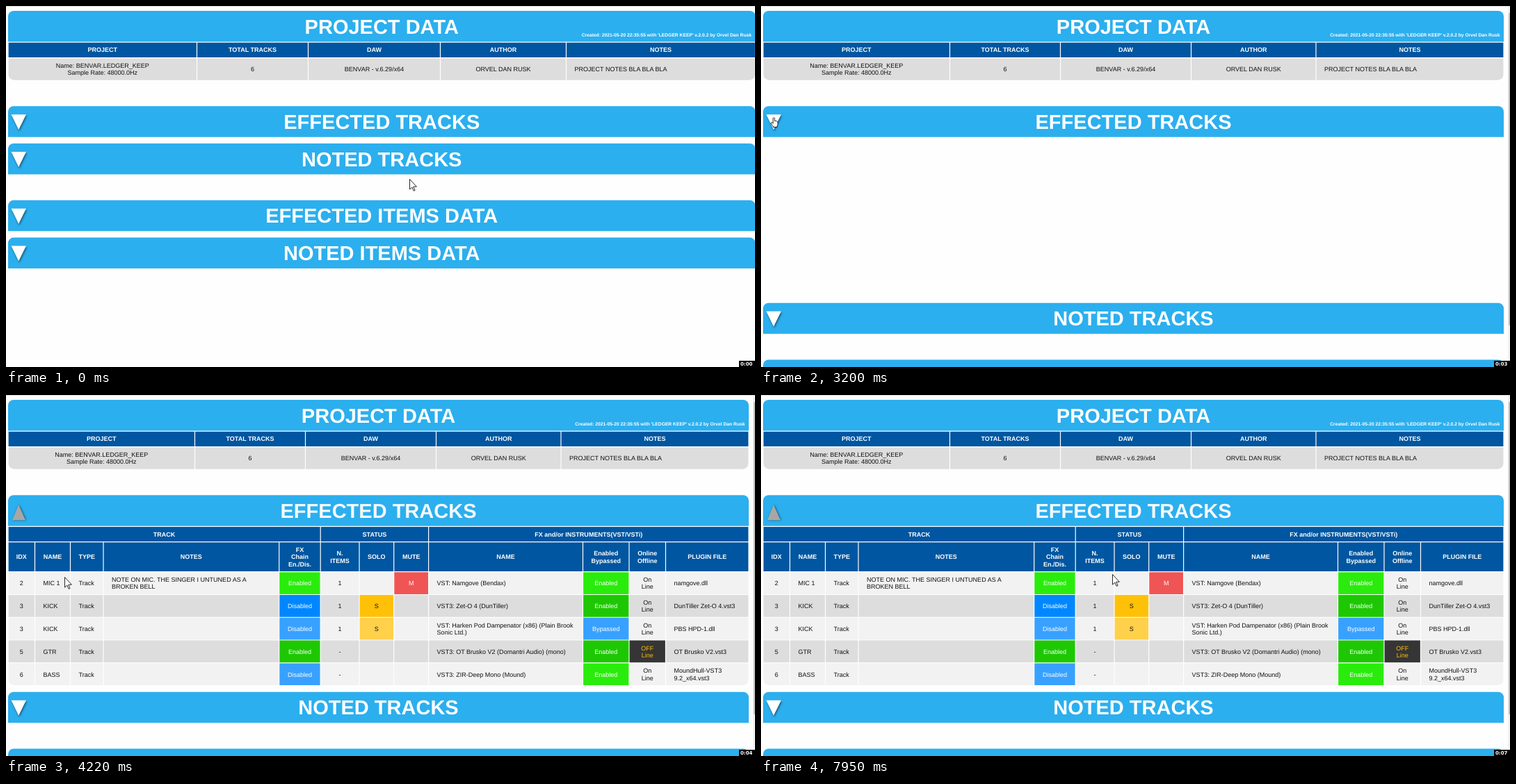
Animation, 1077 px wide and 520 px high, one loop 8000 ms. Source, as an HTML page with a canvas:

```html
<!DOCTYPE html>
<html lang="en">
<head>
<meta charset="utf-8">
<title>Project data</title>
<style>
  html, body { margin: 0; width: 100%; height: 100%; overflow: hidden; background: #fefefe; }
  canvas { display: block; }
</style>
</head>
<body>
<canvas id="stage" width="1077" height="520"></canvas>
<script>
const ctx = document.getElementById('stage').getContext('2d');
const LOOP = 8000;
const OPEN_AT = 3200, SHOW_AT = 3430;
const BAR = '#2cafee', NAVY = '#0056a0', INK = '#111';
const SANS = '"Liberation Sans", Arial, sans-serif';
const CELL = 9.03, HEAD = 29, LINE = 10.2, GAP = 1.2;

const PROJECT_HEAD = ['PROJECT', 'TOTAL TRACKS', 'DAW', 'AUTHOR', 'NOTES'];
const PROJECT_ROW = ['Name: BENVAR.LEDGER_KEEP\nSample Rate: 48000.0Hz', '6',
  'BENVAR - v.6.29/x64', 'ORVEL DAN RUSK', 'PROJECT NOTES BLA BLA BLA'];
const CREATED = "Created: 2021-05-20 22:35:55 with 'LEDGER KEEP' v.2.0.2 by Orvel Dan Rusk";

const EDGES = [3, 41.5, 92.5, 140, 392.7, 452.2, 508, 557.7, 607.6, 829.5, 896, 948.5, 1068];
const GROUPS = [['TRACK', 0, 5], ['STATUS', 5, 8], ['FX and/or INSTRUMENTS(VST/VSTi)', 8, 12]];
const COLUMNS = ['IDX', 'NAME', 'TYPE', 'NOTES', 'FX\nChain\nEn./Dis.', 'N.\nITEMS', 'SOLO', 'MUTE',
  'NAME', 'Enabled\nBypassed', 'Online\nOffline', 'PLUGIN FILE'];
const LEFT_COLUMNS = [1, 2, 3, 8, 11];
const ON = 'On\nLine', OFF = 'OFF\nLine';
const ROWS = [
  ['2', 'MIC 1', 'Track', 'NOTE ON MIC. THE SINGER I UNTUNED AS A\nBROKEN BELL', 'Enabled', '1', '', 'M',
    'VST: Namgove (Bendax)', 'Enabled', ON, 'namgove.dll'],
  ['3', 'KICK', 'Track', '', 'Disabled', '1', 'S', '',
    'VST3: Zet-O 4 (DunTiller)', 'Enabled', ON, 'DunTiller Zet-O 4.vst3'],
  ['3', 'KICK', 'Track', '', 'Disabled', '1', 'S', '',
    'VST: Harken Pod Dampenator (x86) (Plain Brook\nSonic Ltd.)', 'Bypassed', ON, 'PBS HPD-1.dll'],
  ['5', 'GTR', 'Track', '', 'Enabled', '-', '', '',
    'VST3: OT Brusko V2 (Domantri Audio) (mono)', 'Enabled', OFF, 'OT Brusko V2.vst3'],
  ['6', 'BASS', 'Track', '', 'Disabled', '-', '', '',
    'VST3: ZIR-Deep Mono (Mound)', 'Enabled', ON, 'MoundHull-VST3\n9.2_x64.vst3']
];
// Value: [fill on light rows, fill on dark rows, text]
const BADGES = {
  Enabled: ['#2aec0c', '#1dc803', '#fff'],
  Disabled: ['#38a1ff', '#0087ff', '#fff'],
  Bypassed: ['#38a1ff', '#0087ff', '#fff'],
  S: ['#ffd04a', '#ffc107', INK],
  M: ['#f05555', '#f05555', '#fff'],
  [OFF]: ['#353535', '#353535', '#ffc107']
};

// Pointer strokes: start, end, steps, from, bend, to
const STROKES = [
  [1140, 1920, 13, [580, 249], [342, 266], [133, 183]],
  [2020, 2310, 5, [133, 183], [90, 165], [55, 156]],
  [2550, 2900, 6, [55, 156], [35, 156], [18, 160]],
  [3670, 4220, 8, [18, 160], [55, 200], [84, 262]],
  [4280, 4460, 4, [84, 262], [62, 335], [78, 389]],
  [4620, 5420, 14, [78, 389], [190, 310], [299, 233]],
  [5480, 5840, 7, [299, 233], [315, 305], [332, 369]],
  [6200, 6490, 6, [332, 369], [362, 272], [419, 211]],
  [6670, 7440, 14, [419, 211], [420, 315], [422, 418]],
  [7500, 7950, 9, [422, 418], [458, 345], [505, 258]]
];
const TICKS = [960, 2020, 3000, 4000, 5000, 6020, 7000];

const ARROW = new Path2D('M0 0V14.6L3.4 11.5 5.7 16.8 7.6 16 5.3 10.7H9.9Z');
const HAND = new Path2D('M-1.2 1Q0 -.8 1.2 1V5Q4.5 4.8 5.6 6.3V10Q5.6 11.6 4.6 12.4V14H-1V12.6L-4.2 8.6Q-4.2 7 -2.8 7.2L-1.2 8.6Z');

function label(str, x, y, { size = CELL, color = INK, bold = false, align = 'center', font = SANS } = {}) {
  ctx.font = `${bold ? 'bold ' : ''}${size}px ${font}`;
  ctx.textAlign = align;
  ctx.fillStyle = color;
  const lines = str.split('\n');
  lines.forEach((line, i) =>
    ctx.fillText(line, x, y + (i - (lines.length - 1) / 2) * LINE + size * 0.358));
}

function box(x, y, w, h, color, radii = 0) {
  ctx.fillStyle = color;
  ctx.beginPath();
  ctx.roundRect(x, y, w, h, radii);
  ctx.fill();
}

function cell(x0, x1, y, h, color, radii) {
  box(x0 + GAP / 2, y, x1 - x0 - GAP, h, color, radii);
}

function bottomRadii(i, count) {
  return [0, 0, i === count - 1 ? 8 : 0, i === 0 ? 8 : 0];
}

function bar(title, y, right, color = '#fff') {
  box(3, y, right - 3, 44.5, BAR, [8, 8, 0, 0]);
  label(title, (3 + right) / 2, y + 22.2, { size: HEAD, bold: true, color });
}

function triangle(y, up, color) {
  const [tip, base] = up ? [y + 14, y + 36] : [y + 34, y + 12];
  ctx.save();
  ctx.shadowColor = 'rgba(0,0,0,.5)';
  ctx.shadowBlur = 3;
  ctx.shadowOffsetX = 1;
  ctx.shadowOffsetY = up ? 0 : 2;
  ctx.fillStyle = color;
  ctx.beginPath();
  ctx.moveTo(18.2, tip);
  ctx.lineTo(up ? 9 : 7.5, base);
  ctx.lineTo(up ? 28 : 29, base);
  ctx.fill();
  ctx.restore();
}

function projectTable(open, right) {
  const edges = open ? [3, 271.5, 430.5, 618.5, 798, right] : [3, 274.5, 434.5, 624.5, 805.5, right];
  bar('PROJECT DATA', 7, right);
  label(CREATED, right - 5.5, 41.5, { size: 6.73, bold: true, color: '#fff', align: 'right' });
  PROJECT_HEAD.forEach((head, i) => {
    const x0 = edges[i], x1 = edges[i + 1], mid = (x0 + x1) / 2;
    cell(x0, x1, 52.8, 21.2, NAVY);
    label(head, mid, 63, { bold: true, color: '#fff' });
    cell(x0, x1, 75.3, 31.4, '#ddd', bottomRadii(i, 5));
    if (i === 4) label(PROJECT_ROW[i], x0 + 12, 90.8, { align: 'left' });
    else label(PROJECT_ROW[i], mid, 90.8);
  });
}

function trackTable(alpha) {
  ctx.globalAlpha = alpha;
  const white = { bold: true, color: '#fff' };
  for (const [name, a, b] of GROUPS) {
    cell(EDGES[a], EDGES[b], 190, 21, NAVY);
    label(name, (EDGES[a] + EDGES[b]) / 2, 200.5, white);
  }
  COLUMNS.forEach((name, c) => {
    const x0 = EDGES[c], x1 = EDGES[c + 1], mid = (x0 + x1) / 2;
    cell(x0, x1, 212.3, 41.8, NAVY);
    label(name, mid, 233.2, white);
    ROWS.forEach((row, r) => {
      const y = 255.2 + r * 32.8, dark = r % 2, badge = BADGES[row[c]];
      const fill = badge ? badge[dark] : dark ? '#ddd' : '#f2f2f2';
      cell(x0, x1, y, 31.7, fill, r === 4 ? bottomRadii(c, 12) : 0);
      const left = LEFT_COLUMNS.includes(c);
      label(row[c], left ? x0 + 12 : mid, y + 15.9,
        { align: left ? 'left' : 'center', color: badge ? badge[2] : INK });
    });
  });
  ctx.globalAlpha = 1;
}

function pointerAt(t) {
  let pos = STROKES[0][3];
  for (const [start, end, steps, a, b, c] of STROKES) {
    if (t < start) break;
    const step = Math.floor((t - start) / (end - start) * (steps - 1) + 1e-6) + 1;
    const p = Math.min(1, step / steps);
    const u = (p + p * p * (3 - 2 * p)) / 2;
    pos = a.map((v, i) => (1 - u) ** 2 * v + 2 * u * (1 - u) * b[i] + u * u * c[i]);
  }
  return pos;
}

function pointer(t) {
  const [x, y] = pointerAt(t);
  const shape = x < 30 && y < 182 ? HAND : ARROW;
  ctx.save();
  ctx.translate(x + 0.5, y + 0.5);
  ctx.fillStyle = '#fff';
  ctx.fill(shape);
  ctx.strokeStyle = '#111';
  ctx.lineWidth = 0.9;
  ctx.stroke(shape);
  ctx.restore();
}

function clock(t) {
  box(1054, 511, 23, 9, '#000');
  const secs = TICKS.filter(tick => t >= tick).length;
  label('0:0' + secs, 1056, 515.2,
    { size: 7, bold: true, color: '#fff', align: 'left', font: '"DejaVu Sans", sans-serif' });
}

function draw(t) {
  const open = t >= OPEN_AT, shown = t >= SHOW_AT, settled = t >= 3670;
  const right = open ? 1068 : 1077.5, shift = open ? 229.7 : 0;
  box(0, 0, 1077, 520, '#fefefe');
  box(0, 0, 1077, 1, '#dedede');
  projectTable(open, right);

  bar('EFFECTED TRACKS', 144.2, right, settled ? '#f4f9fd' : '#fff');
  triangle(144.2, shown, !shown ? '#fff' : settled ? '#a8a7a6' : '#b6b6b6');
  if (shown) trackTable(settled ? 1 : t >= 3550 ? 0.9 : 0.6);

  [['NOTED TRACKS', 198], ['EFFECTED ITEMS DATA', 279.8], ['NOTED ITEMS DATA', 333.6]].forEach(([title, y]) => {
    bar(title, y + shift, right);
    triangle(y + shift, false, '#fff');
  });

  if (open) {
    box(1074, 1, 3, 519, '#f1f1f1');
    box(1075, 10, 2, 450, '#c1c1c1');
  }
  pointer(t);
  clock(t);
}

ctx.textRendering = 'geometricPrecision';
const began = performance.now();
function frame() {
  draw((performance.now() - began) % LOOP);
  requestAnimationFrame(frame);
}
frame();
</script>
</body>
</html>
```
